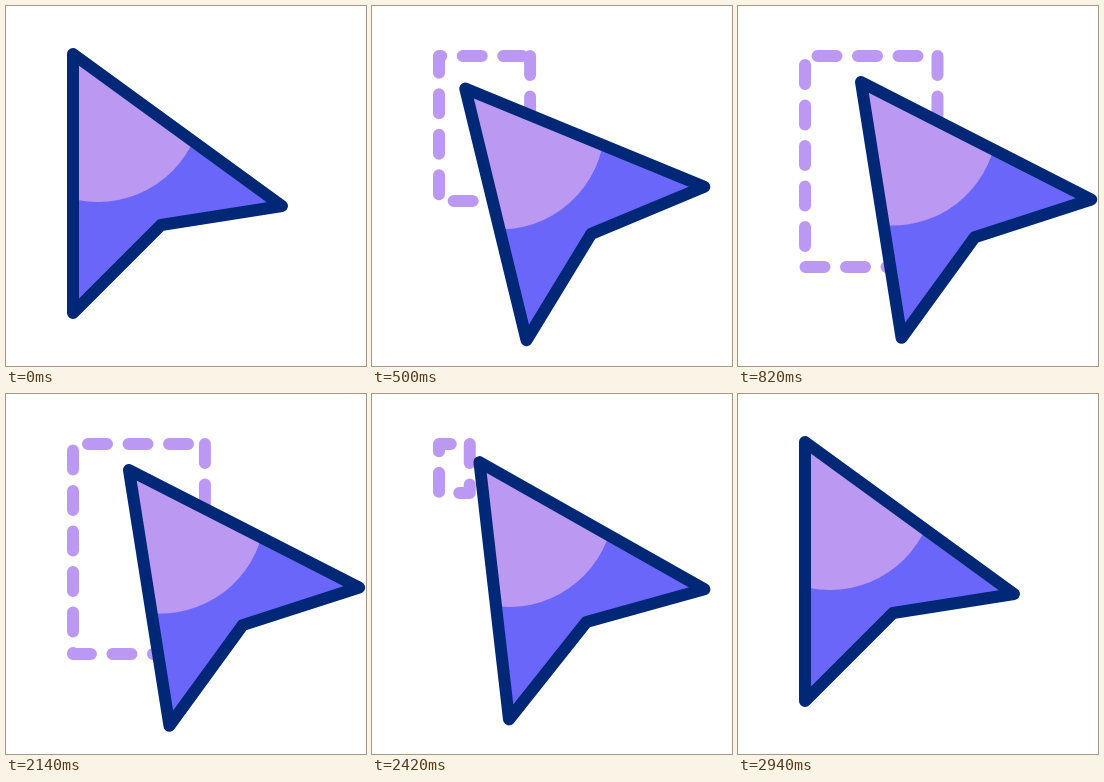
These frames come from a looping animation (360 by 360 pixels, 3.6 s). An HTML page:

```html
<!DOCTYPE html>
<html lang="en">
<head>
<meta charset="utf-8">
<title>Drag selection</title>
<style>
  html, body { margin: 0; width: 100%; height: 100%; overflow: hidden; background: #fff; }
  svg { display: block; width: 100%; height: 100%; }
  path { stroke-width: 12; stroke-linecap: round; stroke-linejoin: round; }
</style>
</head>
<body>
<svg viewBox="0 0 360 360">
  <clipPath id="inside"><path d="M67 48L276 200L155 219L67 307Z"/></clipPath>
  <path id="box" fill="none" stroke="#bb99f2" stroke-dasharray="19 21.5"/>
  <g id="arrow">
    <g clip-path="url(#inside)">
      <rect width="360" height="360" fill="#6a66f9"/>
      <circle cx="92" cy="91" r="105" fill="#bb99f2"/>
    </g>
    <path d="M67 48L276 200L155 219L67 307Z" fill="none" stroke="#002876"/>
  </g>
</svg>
<script>
const LOOP = 3600;
const box = document.getElementById('box');
const arrow = document.getElementById('arrow');

// Cubic easing with flat ends; a and b are the x of its two handles.
function ease(u, a, b) {
  if (u <= 0) return 0;
  if (u >= 1) return 1;
  let lo = 0, hi = 1;
  for (let i = 0; i < 24; i++) {
    const k = (lo + hi) / 2, m = 1 - k;
    if (3 * a * k * m * m + 3 * b * k * k * m + k ** 3 < u) lo = k; else hi = k;
  }
  return lo * lo * (3 - 2 * lo);
}

const span = (t, from, to, a, b) => ease((t - from) / (to - from), a, b);
const mix = (p, q, s) => p.map((v, i) => v + (q[i] - v) * s);

// Poses: x shift, y shift, rotation about the arrow's middle
const rest = [0, 0, 0], windUp = [7.6, 6.3, -24], dragged = [75, 10.1, -9];

function draw(t) {
  const lift = span(t, 0, 260, .33, .67);
  const drag = span(t, 260, 820, .33, .22);
  const back = span(t, 2120, 2940, .5, .45);

  const pose = mix(mix(mix(rest, windUp, lift), dragged, drag), rest, back);
  const [x, y, turn] = pose;
  const arc = 12.8 * drag * (1 - drag);
  arrow.setAttribute('transform', `translate(${x} ${y - arc}) rotate(${turn} 171.5 177.5)`);

  const size = drag * (1 - span(t, 2120, 2680, .33, .33));
  const right = 67 + 132.5 * size, bottom = 50 + 211 * size;
  box.setAttribute('d', size > .002 ? `M${right} 50V${bottom}H67V50H${right}` : '');
}

const start = performance.now();
function frame() {
  draw((performance.now() - start) % LOOP);
  requestAnimationFrame(frame);
}
frame();
</script>
</body>
</html>
```
